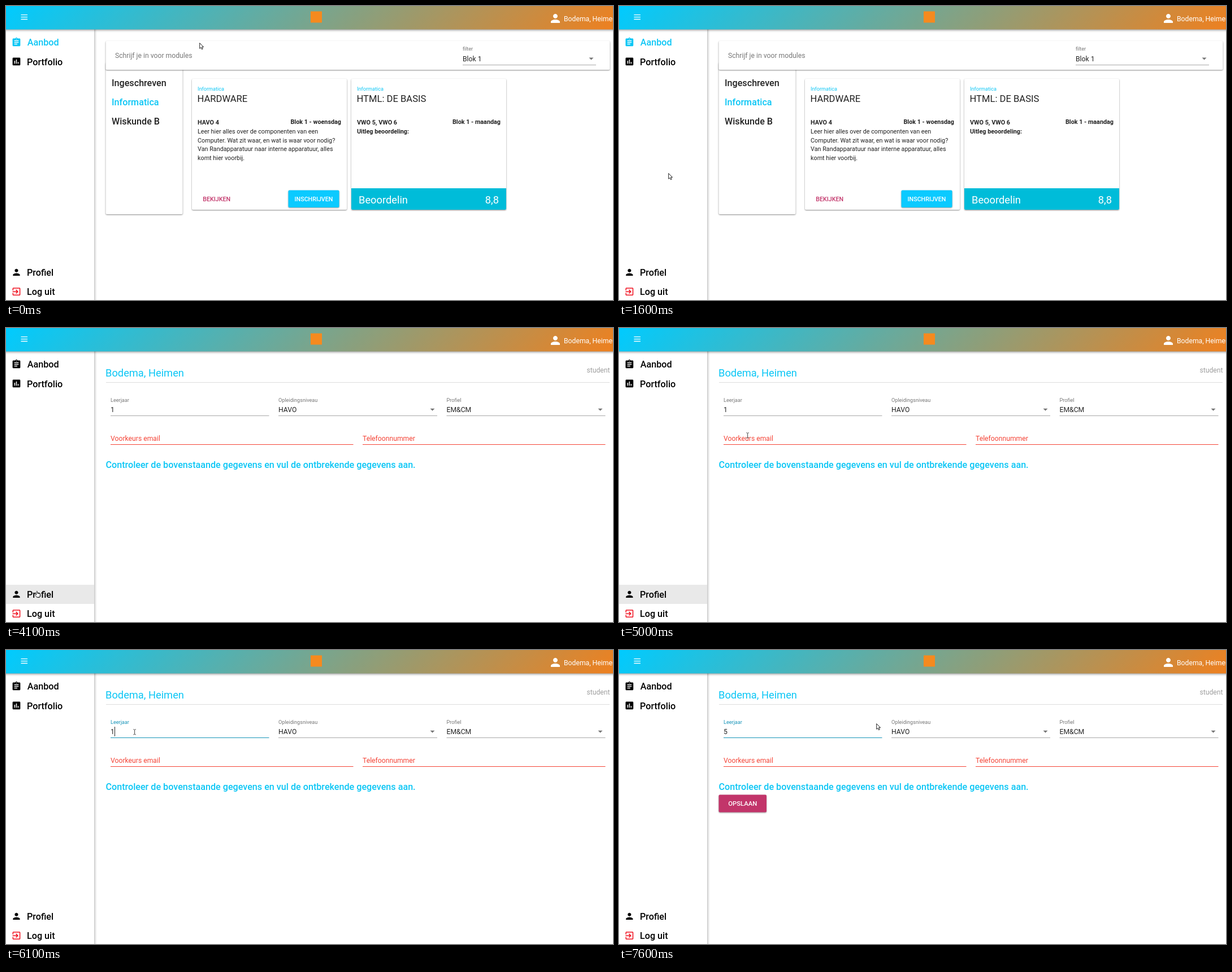
An HTML page for the animation above (8000 ms loop, 1074x521 px).

```html
<!DOCTYPE html>
<html lang="nl">
<head>
<meta charset="utf-8">
<title>Modules en profiel</title>
<style>
  html, body { margin: 0; width: 100%; height: 100%; overflow: hidden; background: #fff; }
  svg { display: block; font: 12.2px Roboto, sans-serif; fill: #222; }
  .title { font-size: 16.15px; font-weight: 500; }
  .black { fill: #000; }
  .headline { font-size: 18.3px; }
  .name { font-size: 16.6px; }
  .small { font-size: 9.15px; }
  .body { font-size: 10.8px; }
  .bold { font-weight: 700; }
  .button { font-size: 10.7px; font-weight: 500; }
  .end { text-anchor: end; }
  .mid { text-anchor: middle; }
  .blue { fill: #0bc6f5; }
  .grey { fill: #777; }
  .red { fill: #f44336; }
  .pink { fill: #c2356a; }
  .white { fill: #fff; }
  .card { fill: #fff; filter: drop-shadow(0 1px 1.3px #0007); }
  .raised { filter: drop-shadow(0 1.5px 1.2px #0006); }
  .line { fill: #a8a8a8; }
</style>
</head>
<body>
<svg width="1074" height="521" viewBox="0 0 1074 521">
  <defs>
    <linearGradient id="sky" gradientUnits="userSpaceOnUse" x1="258" y1="-258" x2="816" y2="300">
      <stop stop-color="#00cbff"/><stop offset="1" stop-color="#ee801f"/>
    </linearGradient>
    <path id="person" d="M12 12c2.2 0 4-1.8 4-4s-1.8-4-4-4-4 1.8-4 4 1.8 4 4 4zm0 2c-2.7 0-8 1.3-8 4v2h16v-2c0-2.7-5.3-4-8-4z"/>
    <path id="drop" d="M-4-2h8l-4 4z" fill="#757575"/>
  </defs>

  <g id="modules">
    <rect class="card" x="176.5" y="100" width="136" height="269" rx="2"/>
    <rect class="card" x="176.5" y="62" width="892" height="51" rx="2"/>
    <text class="grey" x="193" y="92.4">Schrijf je in voor modules</text>
    <text class="small grey" x="808" y="79.3">filter</text>
    <text x="808" y="97.9">Blok 1</text>
    <rect class="line" x="808" y="104" width="236" height="1"/>
    <use href="#drop" x="1035.5" y="93.5"/>
    <g class="title">
      <text x="187" y="141.5">Ingeschreven</text>
      <text class="blue" x="187" y="175.8">Informatica</text>
      <text x="187" y="209.5">Wiskunde B</text>
    </g>

    <rect class="card" x="329" y="129" width="274" height="232" rx="2"/>
    <text class="small blue" x="339" y="149.5">Informatica</text>
    <text class="name" x="338.5" y="170.4">HARDWARE</text>
    <g class="body">
      <text class="bold" x="339" y="209.5">HAVO 4</text>
      <text class="bold end" x="593" y="208.7">Blok 1 - woensdag</text>
      <text x="339" y="225.8">Leer hier alles over de componenten van een</text>
      <text x="339" y="241.5">Computer. Wat zit waar, en wat is waar voor nodig?</text>
      <text x="339" y="257.2">Van Randapparatuur naar interne apparatuur, alles</text>
      <text x="339" y="273">komt hier voorbij.</text>
    </g>
    <text class="button pink mid" x="372.7" y="346">BEKIJKEN</text>
    <rect class="raised" x="499.5" y="326.5" width="90" height="30.5" rx="2" fill="#0bcaff"/>
    <text class="button white mid" x="544.5" y="346">INSCHRIJVEN</text>

    <rect class="card" x="611" y="129" width="274" height="232" rx="2"/>
    <text class="small blue" x="621" y="149.5">Informatica</text>
    <text class="name" x="620.5" y="170.4">HTML: DE BASIS</text>
    <g class="body bold">
      <text x="621" y="209.5">VWO 5, VWO 6</text>
      <text class="end" x="875" y="208.7">Blok 1 - maandag</text>
      <text x="621" y="225.8">Uitleg beoordeling:</text>
    </g>
    <path d="M611 323h274v36q0 2-2 2h-270q-2 0-2-2z" fill="#00bcd9"/>
    <text class="headline white" x="624" y="350.3">Beoordelin</text>
    <text class="headline white end" x="872" y="350.3">8,8</text>
  </g>

  <g id="profile">
    <text class="headline blue" x="176" y="85.5">Bodema, Heimen</text>
    <text class="end" x="1068.5" y="78.5" fill="#9e9e9e">student</text>
    <rect x="177" y="96" width="891" height="1" fill="#ddd"/>
    <text id="yearLabel" class="small" x="185" y="131">Leerjaar</text>
    <text id="year" x="185" y="149"></text>
    <rect id="yearLine" x="185" y="155" width="280.5" height="1"/>
    <rect id="caret" y="136" width="1" height="17"/>
    <text class="small grey" x="482" y="131">Opleidingsniveau</text>
    <text x="482" y="149">HAVO</text>
    <rect class="line" x="482" y="155" width="281" height="1"/>
    <use href="#drop" x="754.5" y="144.7"/>
    <text class="small grey" x="779.5" y="131">Profiel</text>
    <text x="779.5" y="149">EM&amp;CM</text>
    <rect class="line" x="779.5" y="155" width="281" height="1"/>
    <use href="#drop" x="1051.5" y="144.7"/>
    <g class="red">
      <text x="185" y="200">Voorkeurs email</text>
      <rect x="185" y="206" width="429.5" height="1"/>
      <text x="631" y="200">Telefoonnummer</text>
      <rect x="631" y="206" width="429.5" height="1"/>
    </g>
    <text class="title blue" x="176.5" y="247.8">Controleer de bovenstaande gegevens en vul de ontbrekende gegevens aan.</text>
    <g id="save">
      <rect class="pink raised" x="176.5" y="256.5" width="84.5" height="31" rx="2"/>
      <text class="button white mid" x="218.7" y="276.2" style="font-size:11.3px">OPSLAAN</text>
    </g>
  </g>

  <rect y="30" width="156" height="500" fill="#fff" style="filter:drop-shadow(1px 0 2px #0005)"/>
  <rect id="rowHover" y="455" width="156" height="34" fill="#e9e9e9"/>
  <g id="offerItem">
    <path transform="translate(9.3 55.3) scale(.764)" d="M19 3h-4.2C14.4 1.8 13.3 1 12 1s-2.4.8-2.8 2H5c-1.1 0-2 .9-2 2v14c0 1.1.9 2 2 2h14c1.1 0 2-.9 2-2V5c0-1.1-.9-2-2-2zm-7 0c.6 0 1 .4 1 1s-.4 1-1 1-1-.4-1-1 .4-1 1-1zm2 14H7v-2h7zm3-4H7v-2h10zm0-4H7V7h10z"/>
    <text class="title" x="37.7" y="70.3">Aanbod</text>
  </g>
  <g class="black">
    <path transform="translate(9.3 89.3) scale(.764)" d="M19 3H5c-1.1 0-2 .9-2 2v14c0 1.1.9 2 2 2h14c1.1 0 2-.9 2-2V5c0-1.1-.9-2-2-2zM9 17H7v-7h2zm4 0h-2V7h2zm4 0h-2v-4h2z"/>
    <text class="title" x="37" y="104.5">Portfolio</text>
    <use href="#person" transform="translate(9.3 462.7) scale(.764)"/>
    <text class="title" x="37" y="478.4">Profiel</text>
    <path transform="translate(9.3 497) scale(.764)" fill="#f00f1e" d="M10.1 15.6L11.5 17l5-5-5-5-1.4 1.4L12.7 11H3v2h9.7zM19 3H5c-1.1 0-2 .9-2 2v4h2V5h14v14H5v-4H3v4c0 1.1.9 2 2 2h14c1.1 0 2-.9 2-2V5c0-1.1-.9-2-2-2z"/>
    <text class="title" x="37" y="512.2">Log uit</text>
  </g>

  <rect x="-9" y="-9" width="1092" height="50.5" fill="url(#sky)" style="filter:drop-shadow(0 1.5px 2px #0007)"/>
  <path d="M26.5 15.7h11.5M26.5 19.6h11.5M26.5 23.5h11.5" stroke="#fff" stroke-width="1.3"/>
  <rect x="539" y="9.5" width="20" height="20" fill="#f58a1f"/>
  <use href="#person" class="white" x="960" y="10"/>
  <text class="white" x="987" y="26.7">Bodema, Heimen</text>

  <g id="cursor" stroke-linejoin="round">
    <path id="arrow" d="M.7.6v9.8l2.2-2 1.6 3.4 1.7-.8-1.6-3.3h3z" fill="#fff" stroke="#222"/>
    <path id="hand" d="M3 11.5L.8 7.2q-.5-1.4 1.2-.8l1 1V1.3q.8-1.3 1.6 0v3.2l4 .9q1 .4.8 1.6L8.7 11.5z" fill="#fff" stroke="#333" stroke-width=".9"/>
    <path id="beam" d="M1 .8h1.6l.7.7.7-.7h1.6M1 9.8h1.6l.7-.7.7.7h1.6M3.3 1.5v7.6" fill="none" stroke="#444"/>
  </g>
</svg>

<script>
const LOOP = 8000, STEP = 100;
const $ = id => document.getElementById(id);
const show = (id, on) => $(id).style.display = on ? '' : 'none';
const lastBefore = (list, t) => list.findLast(item => item[0] <= t);

// Mouse sweep: time, x, y
const sweep = [[400, 342, 65], [1300, 128, 175], [1600, 87, 296], [2100, 75, 368]];

// Later pointer jumps: time, shape, x, y
const jumps = [
  [2500, 'arrow', 61, 399], [4100, 'hand', 51, 465.5], [4400, 'arrow', 126, 350],
  [4700, 'arrow', 171, 273], [5000, 'beam', 224.3, 185], [5300, 'beam', 224.3, 180],
  [5700, 'beam', 224.3, 140], [7600, 'arrow', 455, 130]
];

// Year field: time, value, label colour, line colour, caret x
const yearStates = [
  [0, '1', '#777', '#a8a8a8', 0],
  [5700, '1', '#777', '#2b2b2b', 0],
  [6100, '1', '#1593b8', '#1593b8', 192],
  [6500, '', '#b5545a', '#f44336', 185],
  [6900, '5', '#1593b8', '#1593b8', 192],
  [7200, '5', '#1593b8', '#1593b8', 0]
];

function pointer(t) {
  const jump = lastBefore(jumps, t);
  if (jump) return jump.slice(1);
  const now = Math.min(2100, Math.max(400, Math.floor(t / STEP) * STEP));
  const i = Math.max(1, sweep.findIndex(p => p[0] >= now));
  const [t0, x0, y0] = sweep[i - 1], [t1, x1, y1] = sweep[i];
  const k = (now - t0) / (t1 - t0);
  return ['arrow', x0 + (x1 - x0) * k, y0 + (y1 - y0) * k];
}

function draw(t) {
  const onProfile = t >= 4100;
  show('modules', !onProfile);
  show('profile', onProfile);
  show('rowHover', onProfile && t < 6100);
  show('save', t >= 6500);
  $('offerItem').setAttribute('class', onProfile ? 'black' : 'blue');

  const [, value, label, line, caretX] = lastBefore(yearStates, t);
  $('year').textContent = value;
  $('yearLabel').style.fill = label;
  $('yearLine').style.fill = line;
  show('caret', caretX);
  $('caret').setAttribute('x', caretX);

  const [shape, x, y] = pointer(t);
  for (const id of ['arrow', 'hand', 'beam']) show(id, id === shape);
  $('cursor').setAttribute('transform', `translate(${x} ${y})`);
}

const start = performance.now();
function tick() {
  draw((performance.now() - start) % LOOP);
  requestAnimationFrame(tick);
}
tick();
</script>
</body>
</html>
```
